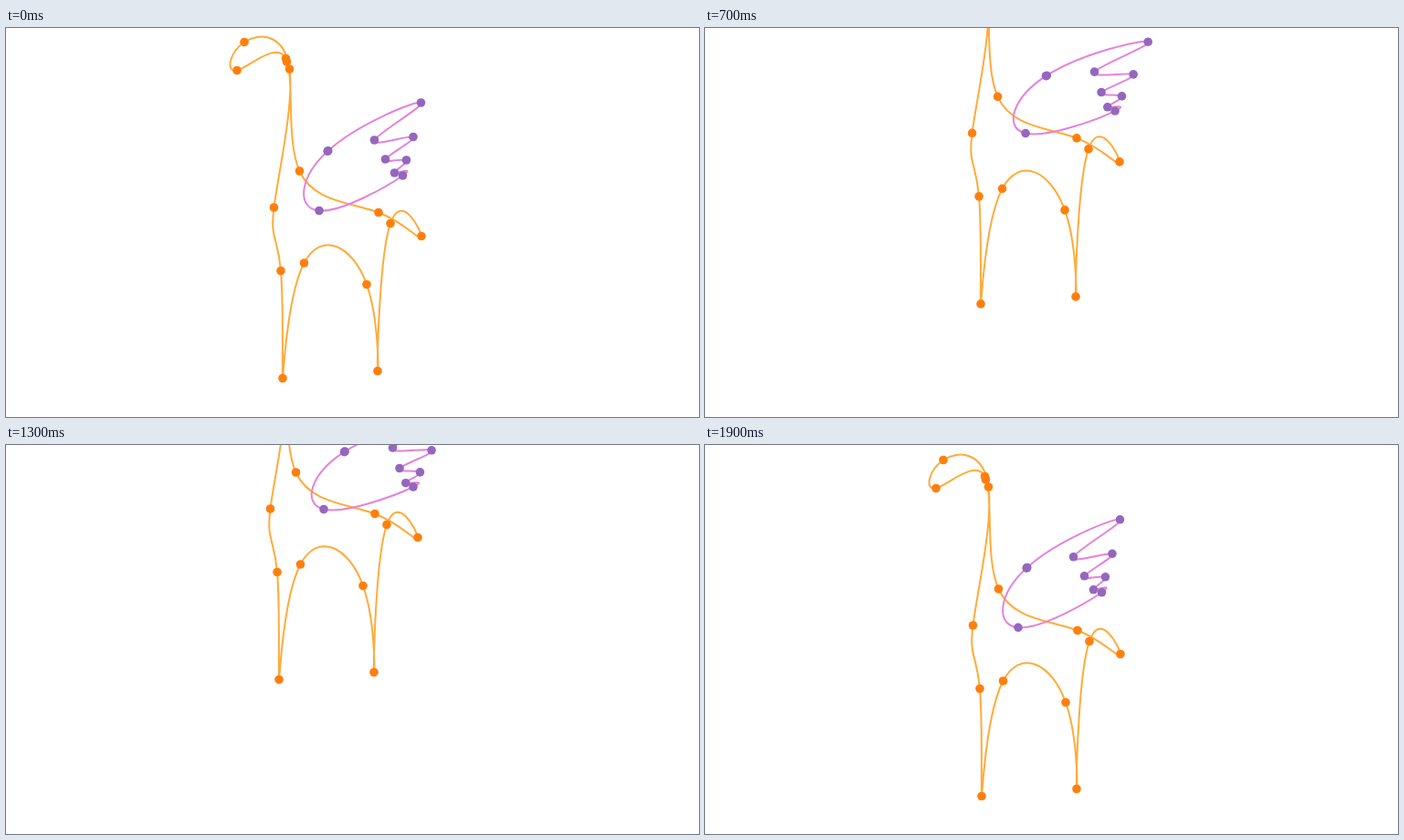
An HTML page with a canvas that plays this animation: 759x427 px, repeating every 2000 ms.

```html
<!DOCTYPE html>
<html lang="en">
<head>
<meta charset="utf-8">
<title>Winged creature</title>
<style>
  html, body { margin: 0; width: 100%; height: 100%; overflow: hidden; background: #fff; }
  canvas { display: block; }
</style>
</head>
<body>
<canvas id="stage" width="759" height="427"></canvas>
<script>
const ctx = document.getElementById('stage').getContext('2d');
const LOOP = 2000, STEP = 100;
const WING_STRETCH = 1.185;

// Each outline is a closed spline; its last dot only marks where the pen came back.
const body = {
  line: '#ffab3a', dot: '#ff7f0e',
  points: [[306.5, 33.5], [321.5, 157], [408, 202.5], [455, 228.5], [421, 214.5],
    [407, 376.5], [395, 281.5], [326.5, 258], [303, 384.5], [301, 266.5],
    [293.5, 197], [310.5, 45], [261, 15.5], [253, 46.5], [307.5, 37]]
};

// Wing points are relative to its root on the body.
const wingRoot = [343, 200.5];
const wing = {
  line: '#e582da', dot: '#9467bd',
  points: [[9.8, -65.8], [111.5, -118.5], [60.5, -77.5], [103, -81], [72.5, -56.5],
    [95.5, -55.5], [82.5, -41.5], [91.5, -38.5], [0, 0], [9.2, -65.2]]
};

// step, sideways drift, body lift, wing lift
const flight = [
  [0, 0, 0, 0],
  [3, 0, 18, 14],
  [5, 1, 54, 55],
  [9, -3, 104, 108.5],
  [13, -4, 127, 130],
  [17, 0, 22, 20.2],
  [19, 0, -1, 0.2]
];

// Smooth curve through the flight keys, at rest at both ends.
function flightAt(step) {
  const i = Math.max(1, flight.findIndex(key => key[0] >= step));
  const a = flight[i - 1], b = flight[i];
  const before = flight[i - 2], after = flight[i + 1];
  const span = b[0] - a[0], t = (step - a[0]) / span;
  return a.map((value, c) => {
    const slopeA = before ? (b[c] - before[c]) / (b[0] - before[0]) : 0;
    const slopeB = after ? (after[c] - a[c]) / (after[0] - a[0]) : 0;
    const ease = t * t * (3 - 2 * t);
    return value + (b[c] - value) * ease
      + span * t * (1 - t) * (slopeA * (1 - t) - slopeB * t);
  });
}

// Velocities of the closed cubic spline with continuous curvature.
function splineVelocities(values) {
  const n = values.length, v = values.map(() => 0);
  for (let pass = 0; pass < 30; pass++) {
    for (let i = 0; i < n; i++) {
      const prev = (i + n - 1) % n, next = (i + 1) % n;
      v[i] = (3 * (values[next] - values[prev]) - v[prev] - v[next]) / 4;
    }
  }
  return v;
}

function strokeSpline(points) {
  const vx = splineVelocities(points.map(p => p[0]));
  const vy = splineVelocities(points.map(p => p[1]));
  ctx.beginPath();
  ctx.moveTo(...points[0]);
  points.forEach(([x, y], i) => {
    const j = (i + 1) % points.length, [endX, endY] = points[j];
    ctx.bezierCurveTo(x + vx[i] / 3, y + vy[i] / 3,
      endX - vx[j] / 3, endY - vy[j] / 3, endX, endY);
  });
  ctx.stroke();
}

function drawShape({ points, line, dot }, place) {
  const placed = points.map(place);
  ctx.strokeStyle = line;
  strokeSpline(placed.slice(0, -1));
  ctx.fillStyle = dot;
  for (const [x, y] of placed) {
    ctx.beginPath();
    ctx.arc(x, y, 4.8, 0, Math.PI * 2);
    ctx.fill();
  }
}

function render(now) {
  const step = Math.floor((now % LOOP) / STEP);
  const [, drift, lift, wingLift] = flightAt(step);

  // The wing beats in ten-degree notches and slides along the back once airborne.
  const beat = 1.5 * Math.cos(2 * Math.PI * (step - 2) / 6.5);
  const angle = 10 * Math.round(beat + 0.3 + 0.06 * step);
  const airborne = Math.min(1, Math.max(0, lift / 15));
  const rootX = wingRoot[0] + drift + airborne * (11.7 - 0.27 * angle);
  const rootY = wingRoot[1] - wingLift;
  const sin = Math.sin(angle * Math.PI / 180), cos = Math.cos(angle * Math.PI / 180);

  ctx.fillStyle = '#fff';
  ctx.fillRect(0, 0, 759, 427);
  ctx.lineWidth = 2;
  ctx.lineJoin = 'round';
  drawShape(body, ([x, y]) => [x + drift, y - lift]);
  drawShape(wing, ([x, y]) => [
    rootX + x * cos - y * sin * WING_STRETCH,
    rootY + x * sin / WING_STRETCH + y * cos
  ]);
}

const start = performance.now();
function tick() {
  render(performance.now() - start);
  requestAnimationFrame(tick);
}
tick();
</script>
</body>
</html>
```
